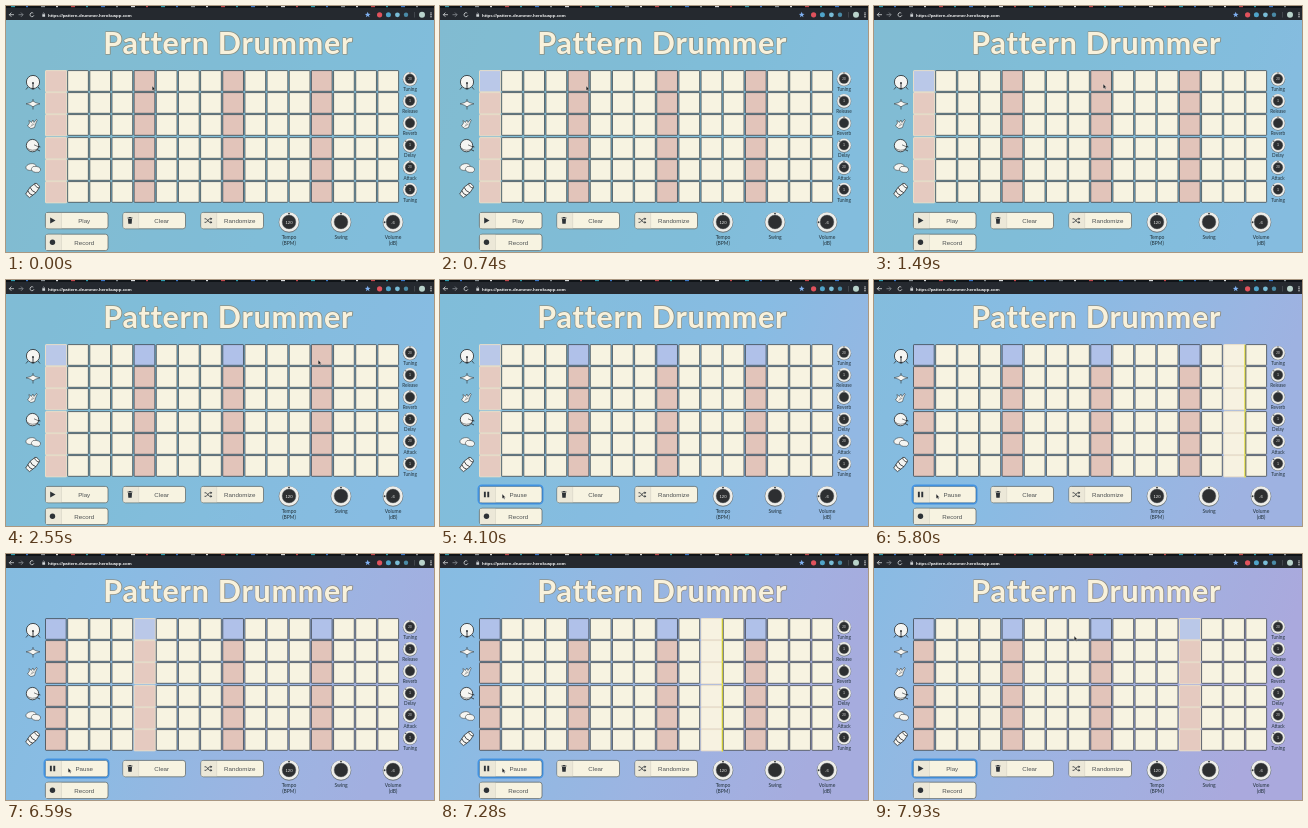
Animation of 428x246 px, one loop 8000 ms. Source, as an HTML page with a canvas:

```html
<!DOCTYPE html>
<html lang="en">
<head>
<meta charset="utf-8">
<title>Pattern Drummer</title>
<style>
html, body { margin: 0; width: 100%; height: 100%; overflow: hidden; background: #81bbcf; }
canvas { display: block; width: 428px; height: 246px; }
</style>
</head>
<body>
<canvas id="stage"></canvas>
<script>
const W = 428, H = 246, LOOP = 8000;
const PLAY_AT = 4020, STOP_AT = 7600, STEP_MS = 125;
const GRID = { x: 39.5, y: 64.6, cols: 16, rows: 6, dx: 22.16, dy: 22.15 };
const CREAM = '#f7f3e1', PINK = '#e2c4ba', BLUE = '#b0c1e9', INK = '#2c3136';
const SANS = '"Liberation Sans", Arial, sans-serif', LATO = 'Lato, sans-serif';

const canvas = document.getElementById('stage');
const dpr = window.devicePixelRatio || 1;
canvas.width = W * dpr;
canvas.height = H * dpr;
const c = canvas.getContext('2d');

// Beat cells of the top row and when they light up
const beats = { 0: 600, 4: 1600, 8: 2350, 12: 3000 };

// Pointer: [time, x, y], eased between neighbours
const pointer = [
  [0, 147, 82], [900, 147, 82], [1400, 230, 80], [2000, 230, 80], [2450, 313, 82],
  [3050, 313, 82], [3750, 63, 216], [7600, 63, 216], [7920, 201, 84], [8000, 201, 84]
];

// Backdrop hues along the drifting gradient
const hues = [
  [0, 129, 187, 207], [0.33, 128, 189, 217], [0.6, 136, 188, 227], [0.8, 156, 180, 226], [1, 170, 169, 221]
];

function hueAt(s) {
  s = Math.min(1, Math.max(0, s));
  const i = Math.max(1, hues.findIndex(h => h[0] >= s));
  const a = hues[i - 1], b = hues[i], k = (s - a[0]) / (b[0] - a[0]);
  return `rgb(${[1, 2, 3].map(n => Math.round(a[n] + (b[n] - a[n]) * k)).join(',')})`;
}

function pointerAt(t) {
  const i = Math.max(1, pointer.findIndex(p => p[0] >= t));
  const a = pointer[i - 1], b = pointer[i];
  let k = (t - a[0]) / (b[0] - a[0]);
  k = k * k * (3 - 2 * k);
  return [a[1] + (b[1] - a[1]) * k, a[2] + (b[2] - a[2]) * k];
}

function paint(fill, stroke, width = 0.8) {
  if (fill) { c.fillStyle = fill; c.fill(); }
  if (stroke) { c.strokeStyle = stroke; c.lineWidth = width; c.stroke(); }
}

function box(x, y, w, h, r, fill, stroke, width) {
  c.beginPath();
  c.roundRect(x, y, w, h, r);
  paint(fill, stroke, width);
}

function disc(x, y, r, fill, stroke, width) {
  oval(x, y, r, r, 0, fill, stroke, width);
}

function oval(x, y, rx, ry, turn, fill, stroke, width) {
  c.beginPath();
  c.ellipse(x, y, rx, ry, turn, 0, Math.PI * 2);
  paint(fill, stroke, width);
}

function path(d, fill, stroke, width) {
  const p = new Path2D(d);
  if (fill) { c.fillStyle = fill; c.fill(p); }
  if (stroke) { c.strokeStyle = stroke; c.lineWidth = width || 0.8; c.stroke(p); }
}

function label(text, x, y, font, color, align = 'center') {
  c.font = font;
  c.fillStyle = color;
  c.textAlign = align;
  c.fillText(text, x, y);
}

function at(x, y, draw) {
  c.save();
  c.translate(x, y);
  draw();
  c.restore();
}

function backdrop(t) {
  const g = c.createLinearGradient(0, 14, 390, 150);
  const shift = t / LOOP * 0.62;
  for (let i = 0; i <= 8; i++) g.addColorStop(i / 8, hueAt(shift + 0.38 * i / 8));
  c.fillStyle = g;
  c.fillRect(0, 0, W, H);
}

function browserBar() {
  c.fillStyle = '#25292f';
  c.fillRect(0, 0, W, 14);
  c.fillStyle = '#101418';
  c.fillRect(0, 0, W, 2);
  const tabs = ['#2f9db0', '#8a9298', '#c24a4f', '#3d79c9', '#d9dcde'];
  for (let i = 0; i < 28; i++) {
    c.fillStyle = tabs[i * 3 % 5];
    c.fillRect(5 + i * 15, 0, i % 2 ? 2 : 4, 1.2);
  }
  path('M8 8.7H3.3M5.4 6.6L3.3 8.7L5.4 10.8', null, '#d5d8da', 0.8);
  path('M12.5 8.7H17M15 6.6L17.1 8.7L15 10.8', null, '#8a8f94', 0.8);
  c.beginPath();
  c.arc(26, 8.7, 2, 0.3, 5.4);
  paint(null, '#d5d8da');
  box(36.3, 8.3, 2.8, 2.4, 0.3, '#cfd3d6');
  path('M36.9 8.4V7.5Q37.7 6.2 38.5 7.5V8.4', null, '#cfd3d6', 0.5);
  label('https://pattern-drummer.herokuapp.com', 42, 10.7, 'bold 4.4px ' + SANS, '#f4f5f5', 'left');
  path('M361.7 5.8L362.5 7.8L364.5 7.9L362.9 9.2L363.5 11.2L361.7 10L359.9 11.2L360.5 9.2L358.9 7.9L360.9 7.8Z', '#7fb0f0');
  disc(373.6, 8.8, 2.6, '#e0525c');
  disc(382.4, 8.8, 2.5, '#4fa3c8');
  disc(391.4, 8.8, 2.4, '#79bcd6');
  disc(400, 8.8, 2.2, '#4a8aa6');
  c.fillStyle = '#555b61';
  c.fillRect(408, 6, 0.6, 5.5);
  disc(416, 8.8, 3, '#b9d3cb');
  for (let i = -1; i < 2; i++) disc(425, 8.8 + i * 1.9, 0.7, '#e4e6e7');
}

function heading() {
  c.letterSpacing = '0.8px';
  c.font = 'bold 30.4px ' + LATO;
  c.textAlign = 'center';
  c.lineJoin = 'round';
  c.strokeStyle = 'rgba(140,130,105,0.75)';
  c.lineWidth = 1.4;
  c.strokeText('Pattern Drummer', 222.4, 48.1);
  c.fillStyle = '#f8f1db';
  c.fillText('Pattern Drummer', 222.2, 47.8);
  c.letterSpacing = '0px';
}

function stepAt(t) {
  if (t < PLAY_AT) return 0;
  return Math.floor((Math.min(t, STOP_AT) - PLAY_AT) / STEP_MS) % GRID.cols;
}

// Rows sit on whole pixels, which leaves one wider gap halfway down
function rowY(row) {
  return GRID.y + Math.round(0.1 + row * GRID.dy);
}

function grid(t) {
  const now = stepAt(t);
  for (let col = 0; col < GRID.cols; col++) {
    const accent = col % 4 === 0, active = col === now;
    const size = active ? 21.2 : 20.7;
    const x = GRID.x + col * GRID.dx;
    for (let row = 0; row < GRID.rows; row++) {
      const y = rowY(row);
      const lit = row === 0 && t >= beats[col];
      box(x, y, size, size, 0.6, lit ? BLUE : accent ? PINK : CREAM,
        active ? '#efdfc6' : '#30373d', active ? 0.9 : 0.7);
      if (active) box(x, y, size, size, 0.6, 'rgba(247,243,225,0.15)');
    }
    if (active && !accent) {
      c.fillStyle = '#e9e336';
      c.fillRect(x + size - 0.6, GRID.y, 1.3, rowY(GRID.rows) - GRID.y);
    }
  }
}

function instruments() {
  const ink = '#262a2d', white = '#f5f5f2';
  // bass drum
  at(27, 76, () => {
    path('M-5 5L-7 7.5M5 5L7 7.5', null, ink, 0.7);
    disc(0, 0, 6.6, white, ink, 0.8);
    path('M0 1V7M-1.3 7H1.3', null, ink, 0.9);
    disc(0, 1, 0.9, ink);
  });
  // hi-hat
  at(27, 98, () => {
    path('M0 -5V5.5', null, ink, 0.6);
    path('M-7 -0.2Q-2 -1 0 -3Q2 -1 7 -0.2Q2 0.9 0 2.8Q-2 0.9 -7 -0.2Z', white, ink, 0.5);
  });
  // clap
  at(26.5, 118, () => {
    path('M-5 2L-3 -1L-3.6 -3.5L-1 -1.6L0.4 -4L1.6 -1.6L4 -4.6L4.6 -3.6L3 0L2 3.5L-1.6 4.6Z', white, ink, 0.5);
    path('M-2 2.4L2 0M-1 0.8L1 -1', null, ink, 0.4);
  });
  // snare
  at(27, 139.6, () => {
    path('M2 -1L7.4 1.4M2 3L7 5.4', null, ink, 0.8);
    disc(-0.5, 0, 6.2, white, ink, 0.8);
    path('M-5.7 2.6Q-1 6.4 4.8 3.2', null, ink, 0.5);
    path('M1 -0.8L6.4 1.6', null, ink, 0.6);
  });
  // cymbals
  at(27.2, 162, () => {
    oval(-2.2, -1, 5.2, 3.3, -0.2, white, ink, 0.5);
    oval(2.8, 1.4, 4.6, 3, 0.2, white, ink, 0.5);
  });
  // conga
  at(27, 184, () => {
    c.rotate(0.75);
    path('M-3 -6L-4 0L-2.6 8H2.6L4 0L3 -6Z', white, ink, 0.7);
    oval(0, -6, 3, 1.4, 0, white, ink, 0.7);
    path('M-3.9 0Q0 2 3.9 0M-3.4 4Q0 6 3.4 4', null, ink, 0.8);
  });
}

function knob(x, y, r, value, turn) {
  disc(x, y + r * 0.05, r, '#6c767c');
  disc(x, y, r * 0.95, '#eeeeea');
  disc(x, y, r * 0.67, '#2d2f31', '#5d6164', 0.4);
  disc(x + Math.sin(turn) * r * 0.82, y - Math.cos(turn) * r * 0.82, r * 0.09, '#33383b');
  if (value) label(value, x, y + r * 0.15, r * 0.42 + 'px ' + SANS, '#e8e8e6');
}

function knobs() {
  const small = ['Tuning', 'Release', 'Reverb', 'Delay', 'Attack', 'Tuning'];
  small.forEach((name, i) => {
    const y = 72.8 + i * GRID.dy;
    knob(404, y, 7.2, i === 2 ? '' : i % 2 ? '.5' : '20', i % 2 ? -0.8 : 0);
    label(name, 404, y + 12.2, '4.7px ' + LATO, '#24343d');
  });
  const big = [[283, '120', 'Tempo', '(BPM)', 0], [335, '', 'Swing', '', 0], [387, '-6', 'Volume', '(dB)', -1.6]];
  for (const [x, value, name, unit, turn] of big) {
    knob(x, 216, 10.3, value, turn);
    label(name, x, 233, '5px ' + LATO, '#22323b');
    label(unit, x, 239.2, '5px ' + LATO, '#22323b');
  }
}

function button(x, y, text, icon, focused) {
  if (focused) box(x - 0.7, y - 0.7, 64.4, 18.4, 3.4, null, '#4394e4', 1.6);
  box(x + 0.4, y + 0.4, 62.6, 16.4, 2.6, CREAM, focused ? '#3d6c96' : '#59605f', 0.7);
  c.fillStyle = '#ece8d8';
  c.fillRect(x + 1, y + 1, 15, 15.2);
  c.fillStyle = '#d3d0c1';
  c.fillRect(x + 16, y + 1, 0.6, 15.2);
  label(text, x + 39.2, y + 10.8, '6.2px ' + SANS, '#4d5152');
  at(x + 7.5, y + 8.5, icon);
}

const icons = {
  play: () => path('M-2.3 -3L3 0L-2.3 3Z', INK),
  pause: () => path('M-2.6 -2.8H-0.7V2.8H-2.6ZM0.8 -2.8H2.7V2.8H0.8Z', INK),
  trash: () => path('M-2.4 -2.9H-0.9V-3.6H0.9V-2.9H2.4V-2H-2.4ZM-2 -1.5H2L1.7 3.2H-1.7Z', INK),
  shuffle: () => {
    path('M-3.5 -1.7H-1.8L1.4 1.8H3M-3.5 1.8H-1.8L1.4 -1.7H3', null, INK, 0.8);
    path('M2.6 -3.1L4.3 -1.7L2.6 -0.3ZM2.6 0.4L4.3 1.8L2.6 3.2Z', INK);
  },
  record: () => disc(0, 0, 2.7, INK)
};

function buttons(t) {
  const playing = t >= PLAY_AT && t < STOP_AT;
  button(39, 206, playing ? 'Pause' : 'Play', playing ? icons.pause : icons.play, t >= PLAY_AT - 60);
  button(116.5, 206, 'Clear', icons.trash);
  button(194.5, 206, 'Randomize', icons.shuffle);
  button(39, 227.8, 'Record', icons.record);
}

function arrow(t) {
  const [x, y] = pointerAt(t);
  at(x - 0.8, y - 2, () => path('M0 0V4.6L1.1 3.7L1.9 5.3L2.7 4.9L1.9 3.4H3.3Z', '#1c1c1c', '#f4f4f4', 0.3));
}

function draw(t) {
  c.setTransform(dpr, 0, 0, dpr, 0, 0);
  backdrop(t);
  browserBar();
  heading();
  instruments();
  grid(t);
  knobs();
  buttons(t);
  arrow(t);
}

const start = performance.now();
function tick() {
  draw((performance.now() - start) % LOOP);
  requestAnimationFrame(tick);
}
tick();
</script>
</body>
</html>
```
